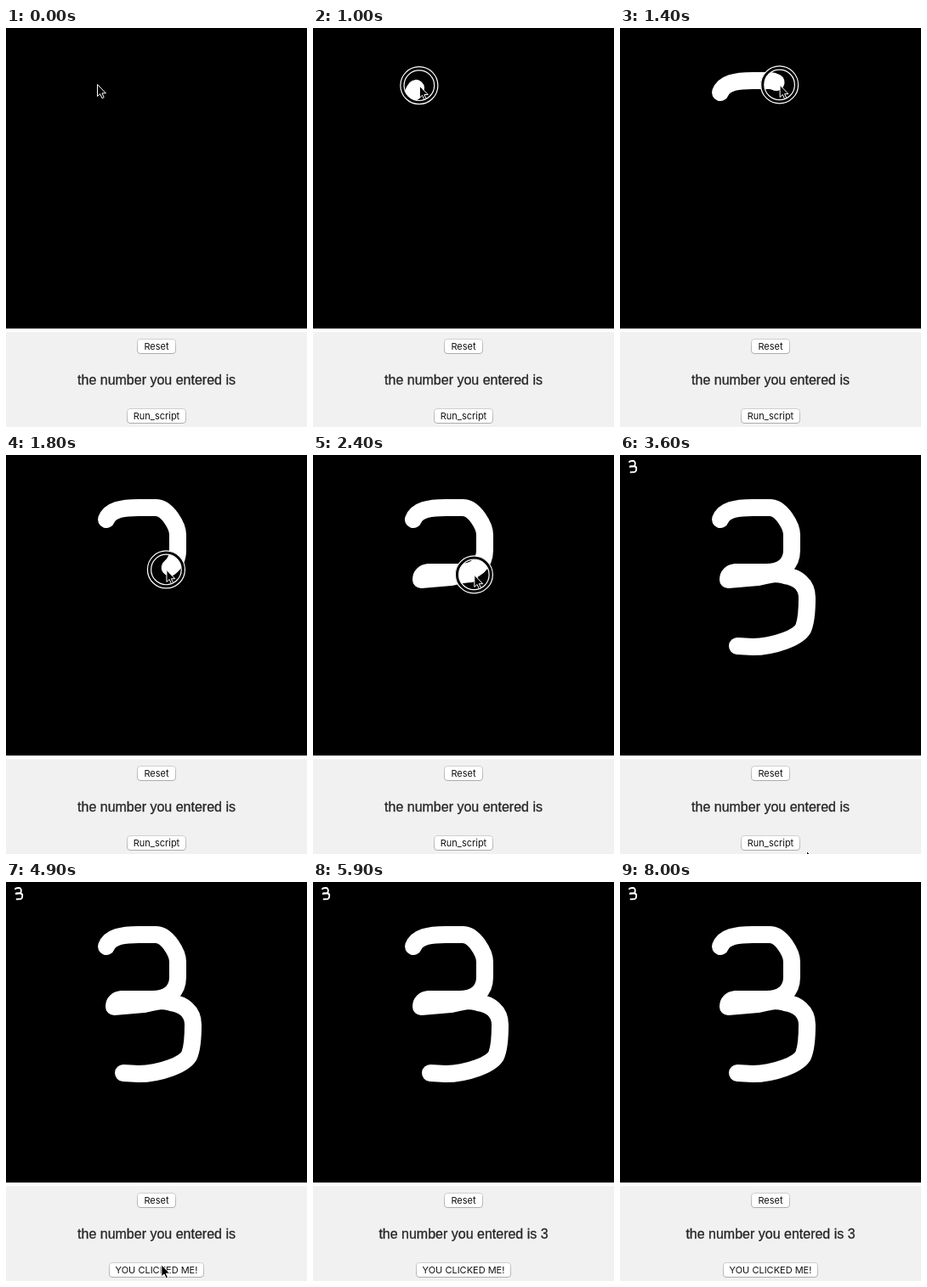
An HTML page that plays this animation: 354x470 px, repeating every 8.8 s.

```html
<!DOCTYPE html>
<html lang="en">
<head>
<meta charset="utf-8">
<title>Digit pad</title>
<style>
  html, body { margin: 0; width: 100%; height: 100%; overflow: hidden; background: #f1f1f1; }
  svg { display: block; width: 354px; height: 470px; }
  text { text-anchor: middle; fill: #111; font: 11px Inter, Roboto, sans-serif; }
  #msg { fill: #262626; stroke: #262626; stroke-width: .3; font: 16px "Liberation Sans", Arial, sans-serif; }
  .btn { fill: #fff; stroke: url(#rim); }
  .pen { fill: none; stroke: #fff; stroke-linecap: round; stroke-linejoin: round; }
</style>
</head>
<body>
<svg viewBox="0 0 354 470">
  <defs>
    <linearGradient id="rim" x2="0" y2="1">
      <stop stop-color="#cfcfcf"/><stop offset="1" stop-color="#adadad"/>
    </linearGradient>
  </defs>
  <rect width="354" height="470" fill="#f1f1f1"/>
  <rect y="354" width="354" height="4" fill="#fff"/>
  <rect width="354" height="354"/>
  <g class="pen" stroke-width="20">
    <path id="ink" d="M118 76 C122 65 136 62 156 62 H176 C190 62 202 84 202 94 V112
      C202 128 192 138 172 138 H136 Q127 139 127 147 L162 144 C175 142 180 138 194 142
      C208 144 220 152 220 168 C220 184 219 195 216 203 C212 215 180 226 156 226 L138 225"/>
  </g>
  <g id="mini" class="pen" stroke-width="23" transform="translate(1.4 2) scale(.081)">
    <use href="#ink"/>
  </g>
  <rect class="btn" x="154.5" y="366.5" width="45" height="17" rx="3.5"/>
  <text x="177" y="379">Reset</text>
  <text id="msg" x="177" y="420"></text>
  <rect id="box" class="btn" y="448.5" height="17" rx="3.5"/>
  <text id="label" x="177" y="461"></text>
  <g id="ring" fill="none" stroke="#fff" stroke-width="1.2">
    <circle r="20" stroke="#000" stroke-width="4.5"/>
    <circle r="22"/>
    <circle r="17.8"/>
  </g>
  <path id="arrow" stroke="#fff" d="M.5 .5V14.5L3.7 11.6 6 16.7 8.2 15.7 6 10.8H10.4Z"/>
</svg>
<script>
const LOOP = 8800, STEP = 100, PEN_DOWN = 900, PEN_UP = 3100, LAG = 5;

const $ = id => document.getElementById(id);
const set = (id, attrs) => { for (const k in attrs) $(id).setAttribute(k, attrs[k]); };
const show = (id, on) => set(id, { visibility: on ? "visible" : "hidden" });

// One pointer trip along a path; it rests at the end until the next trip starts
function trip(from, to, d, power = 1) {
  const path = document.createElementNS("http://www.w3.org/2000/svg", "path");
  path.setAttribute("d", d);
  const length = path.getTotalLength();
  const dist = t => length * Math.min(1, Math.max(0, (t - from) / (to - from))) ** power;
  return { from, dist, at: t => path.getPointAtLength(dist(t)) };
}

const writing = trip(PEN_DOWN, PEN_UP, $("ink").getAttribute("d"), 1.2);
const trips = [
  trip(0, 600, "M107 66 L118 76"),
  writing,
  trip(PEN_UP, 3600, "M138 225 C180 290 280 430 219 466"),
  trip(3600, 3900, "M219 466 L166 457"),
  trip(4500, 4700, "M166 457 H170"),
  trip(4800, 5700, "M170 457 L281 397"),
  trip(5700, 5900, "M281 397 Q360 240 370 240"),
  trip(6700, 6800, "M370 241 H347"),
  trip(7700, 7800, "M347 241 L238 217"),
  trip(7800, 8000, "M238 217 L370 240")
];

function draw(t) {
  const { x, y } = trips.findLast(p => p.from <= t).at(t);
  const move = `translate(${x} ${y})`;
  set("arrow", { transform: move });
  set("ring", { transform: move });
  show("ring", t >= 700 && t <= PEN_UP || t === 4200);

  const drawn = Math.max(0, writing.dist(t) - (t < PEN_UP ? LAG : 0));
  set("ink", { "stroke-dasharray": `${drawn} 999` });
  show("ink", t >= PEN_DOWN);
  set("mini", { display: t > PEN_UP ? "inline" : "none" });

  const clicked = t >= 4200, width = clicked ? 111 : 69;
  set("box", { x: 177 - width / 2, width });
  $("label").textContent = clicked ? "YOU CLICKED ME!" : "Run_script";
  $("msg").textContent = "the number you entered is" + (t >= 5000 ? " 3" : "");
}

const start = performance.now();
function frame() {
  const t = (performance.now() - start) % LOOP;
  draw(Math.floor(t / STEP) * STEP);
  requestAnimationFrame(frame);
}
frame();
</script>
</body>
</html>
```
